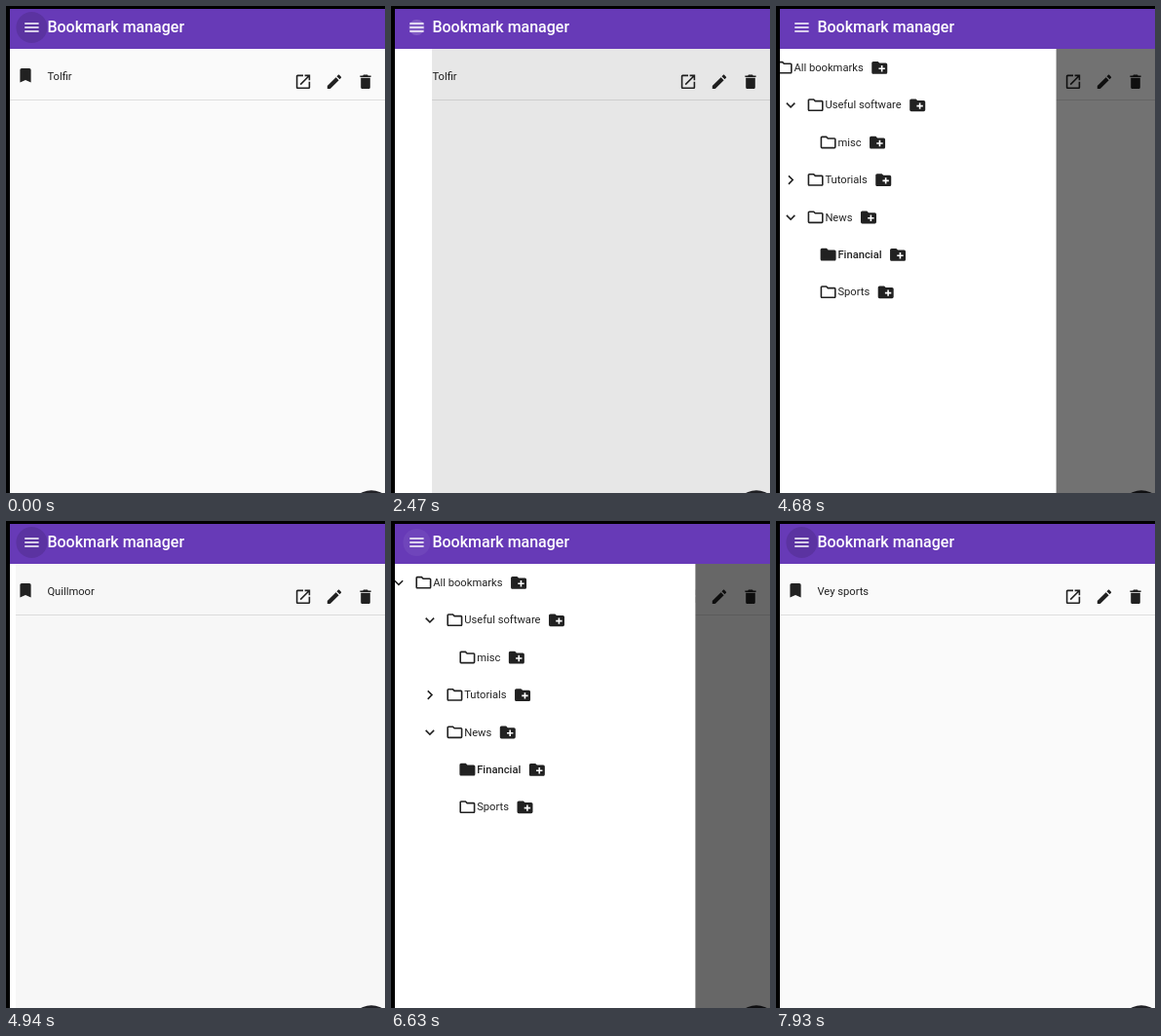
Animation of 389x500 px, one loop 8 s. Source, as an HTML page with a canvas:

```html
<!DOCTYPE html>
<html lang="en">
<head>
<meta charset="utf-8">
<title>Bookmark manager</title>
<style>
html, body { margin: 0; width: 100%; height: 100%; overflow: hidden; background: #000; }
canvas { display: block; width: 389px; height: 500px; }
</style>
</head>
<body>
<canvas id="stage"></canvas>
<script>
const LOOP = 8000, STEP = 130, SLIDE = 400, DRAWER = 314, ROW = 38.4;
const INK = 'rgba(0,0,0,.87)';

const icons = {
  menu: 'M3 18h18v-2H3zm0-5h18v-2H3zm0-7v2h18V6z',
  bookmark: 'M17 3H7c-1.1 0-2 .9-2 2v16l7-3 7 3V5c0-1.1-.9-2-2-2z',
  open: 'M19 19H5V5h7V3H5c-1.1 0-2 .9-2 2v14c0 1.1.9 2 2 2h14c1.1 0 2-.9 2-2v-7h-2zM14 3v2h3.6l-9.8 9.8 1.4 1.4L19 6.4V10h2V3z',
  edit: 'M3 17.25V21h3.75L17.8 9.94l-3.75-3.75zM20.7 7.04c.4-.4.4-1 0-1.4l-2.34-2.35c-.4-.4-1-.4-1.4 0l-1.84 1.83 3.75 3.75z',
  trash: 'M6 19c0 1.1.9 2 2 2h8c1.1 0 2-.9 2-2V7H6zM19 4h-3.5l-1-1h-5l-1 1H5v2h14z',
  down: 'M16.6 8.6L12 13.2 7.4 8.6 6 10l6 6 6-6z',
  right: 'M10 6L8.6 7.4 13.2 12l-4.6 4.6L10 18l6-6z',
  folder: 'M10 4H4c-1.1 0-2 .9-2 2v12c0 1.1.9 2 2 2h16c1.1 0 2-.9 2-2V8c0-1.1-.9-2-2-2h-8z'
};
icons.outline = icons.folder + 'M9.2 6l2 2H20v10H4V6z';
icons.add = icons.folder + 'M19 14h-3v3h-2v-3h-3v-2h3V9h2v3h3z';
for (const name in icons) icons[name] = new Path2D(icons[name]);

const canvas = document.getElementById('stage');
const ctx = canvas.getContext('2d');
const dpr = window.devicePixelRatio || 1;
canvas.width = 389 * dpr;
canvas.height = 500 * dpr;
ctx.scale(dpr, dpr);

const ramp = (t, from, to) => Math.min(1, Math.max(0, (t - from) / (to - from)));

// cubic-bezier(.25, .8, .25, 1)
function ease(x) {
  const curve = (a, b, s) => 3 * a * s * (1 - s) ** 2 + 3 * b * s * s * (1 - s) + s ** 3;
  let lo = 0, hi = 1;
  for (let i = 0; i < 24; i++) {
    const mid = (lo + hi) / 2;
    if (curve(.25, .25, mid) < x) lo = mid; else hi = mid;
  }
  return curve(.8, 1, hi);
}
const slide = (t, start) => ease(ramp(t, start, start + SLIDE));

function rect(x, y, w, h, color) {
  ctx.fillStyle = color;
  ctx.fillRect(x, y, w, h);
}

function disc(x, y, r, color) {
  ctx.fillStyle = color;
  ctx.beginPath();
  ctx.arc(x, y, r, 0, 7);
  ctx.fill();
}

function icon(name, x, y, color = INK) {
  ctx.save();
  ctx.translate(x, y);
  ctx.scale(.8, .8);
  ctx.translate(-12, -12);
  ctx.fillStyle = color;
  ctx.fill(icons[name], 'evenodd');
  ctx.restore();
}

function text(label, x, y, weight = 400, size = 11.2, color = INK) {
  ctx.font = `${weight} ${size}px Roboto, sans-serif`;
  ctx.fillStyle = color;
  ctx.fillText(label, x, y);
  return ctx.measureText(label).width;
}

function drawPage(bookmark) {
  rect(0, 0, 389, 500, '#fafafa');
  icon('bookmark', 20, 71.3);
  text(bookmark, 42.4, 76);
  icon('open', 305, 77.8);
  icon('edit', 337, 77.8);
  icon('trash', 369, 77.8);
  rect(4, 96, 385, 1, '#dedede');
  disc(375, 519.6, 22.4, '#212126');
}

function drawTree(t, selected) {
  const newsOpen = t >= 4030;
  const rows = [
    ['All bookmarks', 0, 'down'],
    ['Useful software', 32, 'down'],
    ['misc', 45],
    ['Tutorials', 32, 'right'],
    ['News', 32, newsOpen ? 'down' : 'right']
  ];
  if (newsOpen) rows.push(['Financial', 45], ['Sports', 45]);

  const focus = ramp(t, 2860, 3250) - ramp(t, 3900, 4160)
    + ramp(t, 6760, 7150) - ramp(t, 7410, 7670);
  disc(13.5, 63, 16, `rgba(0,0,0,${.12 * focus})`);
  if (newsOpen) disc(45.5, 63 + 4 * ROW, 16, `rgba(0,0,0,${.06 * (1 - ramp(t, 4030, 4160))})`);

  rows.forEach(([label, indent, chevron], i) => {
    const y = 63 + i * ROW, active = label === selected;
    if (chevron) icon(chevron, 13.5 + indent, y + .4);
    icon(active ? 'folder' : 'outline', 39 + indent, y + .2);
    const width = text(label, 48.8 + indent, y + 4, active ? 500 : 400);
    icon('add', 65.3 + indent + width, y + .4);
  });
}

// [time, shade, radius, alpha] of the circle behind the menu button
const menuStates = [
  [0, 0, 16, .12], [780, 0, 16, .05], [910, 0, 16, 0],
  [2470, 255, 8, .18], [2600, 255, 12, .1], [2730, 255, 15, .05], [2860, 0, 16, 0],
  [4810, 0, 16, .12], [5590, 0, 16, .09], [5850, 0, 16, .12],
  [6370, 0, 16, .2], [6500, 255, 12, .1], [6630, 255, 14, .06], [6760, 0, 16, 0],
  [7800, 0, 16, .12]
];

function drawToolbar(t) {
  rect(0, 0, 389, 44, '#673ab7');
  const [, shade, radius, alpha] = menuStates.filter(s => s[0] <= t).pop();
  disc(26.4, 22, radius, `rgba(${shade},${shade},${shade},${alpha})`);
  icon('menu', 26.4, 22, '#fff');
  text('Bookmark manager', 42.4, 27, 500, 16, '#fff');
}

function draw(t) {
  const [selected, bookmark] = t < 4550 ? ['Useful software', 'Tolfir']
    : t < 7540 ? ['Financial', 'Quillmoor'] : ['Sports', 'Vey sports'];
  const open = slide(t, 2455) - slide(t, 4668) + slide(t, 6355) - slide(t, 7575);

  drawPage(bookmark);
  rect(0, 44, 389, 456, `rgba(0,0,0,${.6 * open})`);
  if (open > .001) {
    ctx.save();
    ctx.translate(DRAWER * (open - 1), 0);
    rect(4, 44, DRAWER, 456, '#fff');
    drawTree(t, selected);
    ctx.restore();
  }
  drawToolbar(t);
  rect(0, 0, 389, 3, '#000');
  rect(0, 0, 4, 500, '#000');
}

// The screen refreshes in fixed steps
function frame() {
  const t = performance.now() % LOOP;
  draw(Math.floor(t / STEP) * STEP);
  requestAnimationFrame(frame);
}
frame();
</script>
</body>
</html>
```
